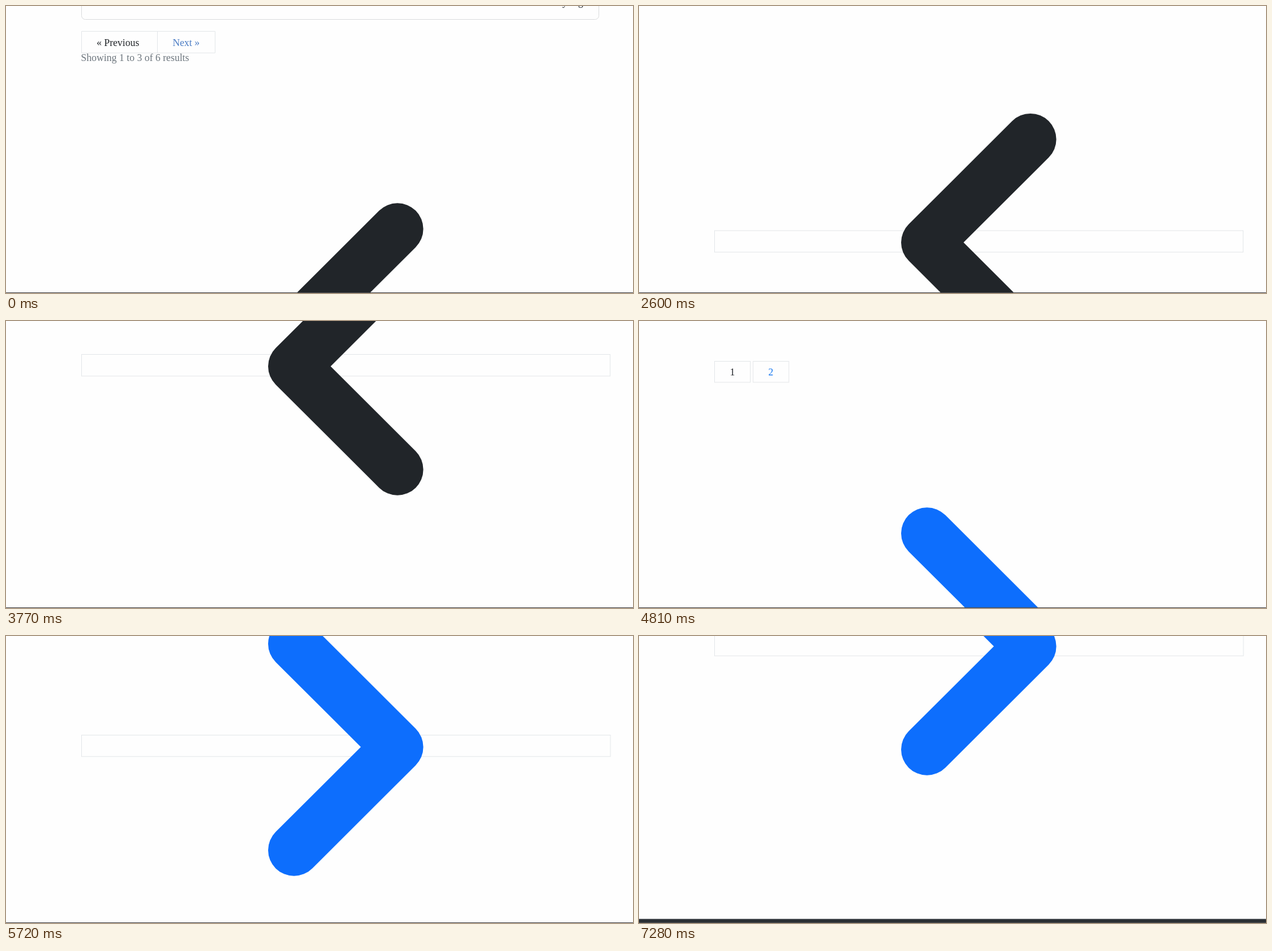
Recreate the animation shown at these times as an HTML page. Size 1000 px wide and 459 px high, loop 8.71 s.

```html
<!DOCTYPE html>
<html lang="en">
<head>
<meta charset="utf-8">
<title>Pagination scroll</title>
<style>
  html, body { margin: 0; width: 100%; height: 100%; overflow: hidden; background: #fefefe; }
  svg { display: block; width: 1000px; height: 459px; }
  text { font: 16px "Liberation Serif", "Times New Roman", serif; fill: #212529; }
  .box { fill: none; stroke: #e5e8ea; }
  .chevron { fill: none; stroke: #212529; stroke-width: 82.5; stroke-linecap: round; stroke-linejoin: round; }
  .chevron.link { stroke: #0d6efd; }
</style>
</head>
<body>
<svg viewBox="0 0 1000 459">
  <g id="page">
    <rect class="box" x="120.5" y="-60.5" width="825" height="82" rx="6" style="stroke:#dcdedf"/>
    <text x="928.5" y="-1.5" text-anchor="end">days ago</text>

    <path class="box" d="M120.5 40.5H333.5V75H120.5ZM241.5 40.5V75"/>
    <text x="144.5" y="63.5">« Previous</text>
    <text x="265.7" y="63.5" style="fill:#4a7cc4">Next »</text>
    <text x="119.6" y="87.5" style="fill:#6c757d">Showing 1 to 3 of 6 results</text>

    <rect class="box" x="120.5" y="502.5" width="843" height="34.5"/>
    <path class="chevron" d="M624.3 356.5l-165 165l165 165"/>

    <rect class="box" x="120.5" y="928.5" width="57" height="33.5"/>
    <rect class="box" x="182" y="928.5" width="57" height="33.5"/>
    <text x="149" y="951" text-anchor="middle">1</text>
    <text x="210.3" y="951" text-anchor="middle" style="fill:#1677f0">2</text>

    <rect class="box" x="120.5" y="1349.5" width="843.5" height="34.3"/>
    <path class="chevron link" d="M459.3 1203.5l165 165l-165 165"/>

    <rect y="1804.5" width="1000" height="60" fill="#2a2f34"/>
  </g>
  <rect y="458" width="1000" height="1" fill="#4c4c4e"/>
</svg>
<script>
const LOOP = 8710, STEP = 130;
const page = document.getElementById("page");

// [time in ms, scroll offset in px] of the long scroll
const keys = [[2080, 36], [3120, 258.5], [3770, 449], [4810, 864], [5720, 1191], [6240, 1352]];
const last = keys.length - 1;

function slope(i) {
  const [t0, y0] = keys[Math.max(i - 1, 0)];
  const [t1, y1] = keys[Math.min(i + 1, last)];
  return (y1 - y0) / (t1 - t0);
}

function scrollAt(t) {
  if (t < 1820) return 0;
  if (t < 1950) return 24;
  if (t < 2210) return 36;
  if (t >= keys[last][0]) return keys[last][1];
  const i = keys.findIndex(([time]) => time > t) - 1;
  const [t0, y0] = keys[i], [t1, y1] = keys[i + 1];
  const span = t1 - t0, u = (t - t0) / span, v = 1 - u;
  // cubic Hermite segment
  return v * v * ((1 + 2 * u) * y0 + u * span * slope(i))
       + u * u * ((1 + 2 * v) * y1 - v * span * slope(i + 1));
}

function draw(now) {
  const t = Math.floor((now % LOOP) / STEP) * STEP;
  page.setAttribute("transform", `translate(0 ${-scrollAt(t).toFixed(1)})`);
  requestAnimationFrame(draw);
}
draw(performance.now());
</script>
</body>
</html>
```
